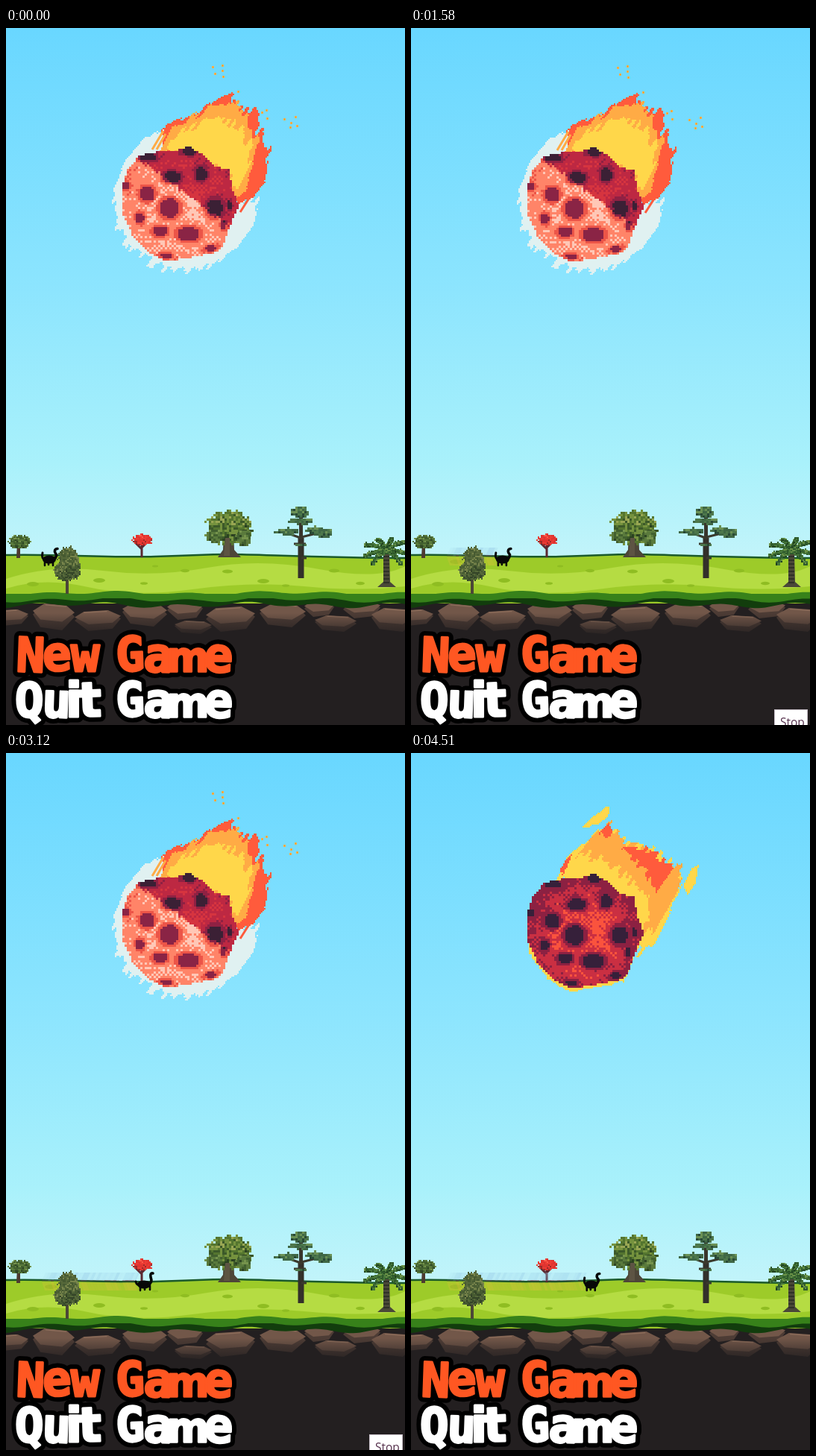
These frames come from a looping animation (535 px wide and 935 px high, 4.58 s). An HTML page with a canvas:

```html
<!DOCTYPE html>
<html lang="en">
<head>
<meta charset="utf-8">
<title>Meteor menu</title>
<style>
html, body { margin: 0; width: 100%; height: 100%; overflow: hidden; background: #231f20; }
canvas, svg { position: absolute; left: 0; top: 0; width: 535px; height: 935px; display: block; }
.menu { font: bold 64px "DejaVu Sans Mono", monospace; stroke-linejoin: round; }
.menu .s { font-family: "DejaVu Sans", sans-serif; }
.menu .m { font-size: 55px; }
.tip { font: 15.5px "Open Sans", sans-serif; }
</style>
</head>
<body>
<canvas id="stage" width="535" height="935"></canvas>
<svg viewBox="0 0 535 935">
  <defs>
    <text id="new" class="menu" y="863" rotate="2 -3 0 0 -2 2 0 2"><tspan x="13">N</tspan><tspan x="50">e</tspan><tspan x="87">w</tspan> <tspan x="148">G</tspan><tspan x="184">a</tspan><tspan class="s m" x="215">m</tspan><tspan x="265">e</tspan></text>
    <text id="quit" class="menu" y="924" rotate="0 2 0 -2 0 -2 2 0 2"><tspan x="12">Q</tspan><tspan x="48">u</tspan><tspan class="s" x="80">i</tspan><tspan class="s" x="98">t</tspan> <tspan x="148">G</tspan><tspan x="184">a</tspan><tspan class="s m" x="215">m</tspan><tspan x="265">e</tspan></text>
  </defs>
  <g stroke="#000" stroke-width="15"><use href="#new"/><use href="#quit"/></g>
  <use href="#new" fill="#ff5722" stroke="#ff5722" stroke-width="3"/>
  <use href="#quit" fill="#fff" stroke="#fff" stroke-width="3"/>
  <g id="tip" class="tip">
    <rect x="487.5" y="914.5" width="44" height="30" fill="#fff" stroke="#c9c0c9"/>
    <text x="495" y="936.5" fill="#55304c">Stop</text>
  </g>
</svg>
<script>
const W = 535, H = 935, LOOP = 4580, STEP = LOOP / 70, BEAT = 520;

const hash = (a, b = 0) => {
  const s = Math.sin(a * 127.1 + b * 311.7) * 43758.5453;
  return s - Math.floor(s);
};
const pick = (list, r) => list[Math.min(list.length - 1, Math.floor(r * list.length))];
const layer = () => Object.assign(document.createElement('canvas'), { width: W, height: H }).getContext('2d');
const poly = pts => new Path2D('M' + pts + 'Z');

function fill(g, color, d) {
  g.fillStyle = color;
  g.fill(new Path2D(d));
}

function line(g, color, width, d) {
  g.strokeStyle = color;
  g.lineWidth = width;
  g.stroke(new Path2D(d));
}

function ellipse(g, color, x, y, rx, ry) {
  g.fillStyle = color;
  g.beginPath();
  g.ellipse(x, y, rx, ry, 0, 0, 7);
  g.fill();
}

// Speckled clump of leaves, lighter toward the top
function leaves(g, cols, x, y, rx, ry, px = 2) {
  for (let j = -ry; j < ry; j += px)
    for (let i = -rx; i < rx; i += px) {
      const d = (i / rx) ** 2 + (j / ry) ** 2;
      const r = hash(x + i, y + j);
      if (d > .6 + .5 * r) continue;
      g.fillStyle = pick(cols, .65 * hash(y + j, x + i) + .35 * (.5 + j / ry / 2));
      g.fillRect(Math.round(x + i), Math.round(y + j), px, px);
    }
}

// ---- Scenery ----
function scenery() {
  const g = layer();
  const sky = g.createLinearGradient(0, 0, 0, 710);
  [[0, '#69d7ff'], [.5, '#8de5fe'], [.82, '#a9f1fb'], [1, '#c2f4fa']].forEach(s => sky.addColorStop(...s));
  g.fillStyle = sky;
  g.fillRect(0, 0, W, 720);

  const ridge = 'M0 707C60 705 130 711 200 709S260 706 300 706S420 711 535 711';
  fill(g, '#9dcb29', ridge + 'V780H0Z');
  line(g, '#1b5a2b', 2.5, ridge);
  fill(g, '#b5dc43', 'M0 739Q60 719 130 728T270 724T420 726T535 722V749Q470 756 400 749T250 753T110 750T0 752Z');
  for (const [x, y, r] of [[60, 716, 8], [36, 746, 8], [125, 741, 8], [185, 745, 5], [240, 728, 6],
    [297, 729, 7], [345, 742, 8], [375, 748, 5], [440, 728, 7], [475, 745, 6], [200, 722, 4]])
    ellipse(g, '#8fbd22', x, y, r, r * .36);

  fill(g, '#231f20', 'M0 772H535V935H0Z');
  const stones = [[-22, 780, 52, 22], [36, 772, 56, 36], [92, 781, 62, 28], [156, 770, 60, 33], [216, 768, 48, 26],
    [226, 795, 50, 18], [268, 776, 66, 34], [340, 772, 62, 32], [400, 768, 40, 22], [414, 788, 56, 22],
    [452, 768, 50, 24], [490, 778, 60, 32]];
  stones.forEach(([x, y, w, h], k) => {
    const at = (u, v, s) => `${x + w * (k % 2 ? 1 - u : u)},${y + h * v * s}`;
    const stone = s => [[0, .5], [.2, .1], [.72, 0], [1, .4], [.82, .88], [.3, 1]].map(p => at(...p, s)).join(' ');
    g.fillStyle = '#4d3c35';
    g.fill(poly(stone(1)));
    g.fillStyle = '#725749';
    g.fill(poly(stone(.68)));
    line(g, '#8a6b59', 1.5, `M${at(.2, .12, 1)} ${at(.7, .05, 1)}`);
  });
  const fade = g.createLinearGradient(0, 785, 0, 820);
  fade.addColorStop(0, '#231f2000');
  fade.addColorStop(1, '#231f20');
  g.fillStyle = fade;
  g.fillRect(0, 785, W, 40);

  const turf = (base, amp, ph) => {
    let d = 'M0 758';
    for (let x = 0; x <= W; x += 5)
      d += `L${x} ${base + amp * Math.sin(x / 15 + ph) + amp * .7 * Math.sin(x / 37 + ph)}`;
    return d;
  };
  const top = turf(758, 1.8, 1) + 'L535 765H0Z';
  fill(g, '#123d0d', turf(774, 2.6, 2) + 'V760H0Z');
  fill(g, '#37811a', turf(767, 2.2, 1) + 'V759H0Z');
  fill(g, '#37811a', top);

  const green = ['#75934c', '#5a7a3c', '#42602f', '#2d4423'];
  fill(g, '#4d3a30', 'M15 690H19V711H14Z');
  leaves(g, green, 18, 688, 16, 10);

  line(g, '#5b2730', 3, 'M182 710V686M182 699L174 691M182 697L190 689');
  leaves(g, ['#ff5b48', '#ec3c34', '#e03430', '#9c2b28'], 182, 686, 14, 8);

  fill(g, '#4d4638', 'M292 672H305L306 700L315 710H284L291 700Z');
  leaves(g, ['#98a653', '#75923e', '#54752f', '#3c5929', '#2b4121'], 298, 668, 32, 25, 3);
  leaves(g, green, 278, 680, 12, 10, 3);
  leaves(g, green, 318, 683, 11, 12, 3);
  fill(g, '#5d5443', 'M294 684H300V708H292Z');

  line(g, '#33302a', 8, 'M395.5 738V684');
  line(g, '#39362d', 5, 'M395.5 686V650');
  line(g, '#3a3a2d', 3, 'M395 684L370 675M396 683L424 676M386 692H402M396 711H403');
  for (const p of [[392, 648, 13, 9], [393, 660, 18, 5], [376, 674, 17, 5], [412, 672, 14, 5], [425, 676, 12, 7], [394, 691, 9, 2]])
    leaves(g, ['#6b9155', '#4d774b', '#3f6745', '#294936'], ...p, 3);

  fill(g, '#4a4838', 'M506 704H514L515 743L523 750H498L506 743Z');
  for (let y = 708; y < 746; y += 5) fill(g, '#2f3127', `M506 ${y}h8v2h-8Z`);
  for (const [x, y] of [[481, 693], [480, 708], [490, 718], [497, 686], [516, 685], [533, 689], [538, 706], [529, 718]])
    for (let k = 0; k <= 1; k += .16) {
      const cx = 510 + (x - 510) * k, cy = 700 + (y - 700) * k - 9 * k * (1 - k);
      leaves(g, ['#6a9147', '#47773a', '#2f5a2c', '#20421f'], Math.round(cx), Math.round(cy), 4, 4);
    }
  return g.canvas;
}

function bush() {
  const g = layer();
  line(g, '#4b4737', 4, 'M82 759V720M82 740L74 728M82 738L91 726');
  for (const p of [[82, 709, 14, 15], [78, 727, 15, 15], [89, 722, 11, 18], [72, 730, 8, 8]])
    leaves(g, ['#77844b', '#56683a', '#465a31', '#344428'], ...p);
  return g.canvas;
}

// ---- Meteor ----
const RED = '#ff5b3c', ORANGE = '#ffab45', YELLOW = '#ffd74a';

const hot = halo => [
  ['#e0f1f1', 14, halo],
  [RED, 16, '206,165 210,131 240,119 270,104 298,87 308,100 332,108 338,135 352,157 347,205 332,224 306,238 250,200'],
  [ORANGE, 16, '206,165 222,131 270,108 299,97 322,113 338,150 332,180 318,222 300,232 240,190'],
  [YELLOW, 20, '213,168 225,142 262,127 300,122 322,150 328,178 310,216 298,205 260,175']
];
const poses = {
  hot: { lit: true, seed: 1, layers: hot('210,134 180,152 158,178 143,215 145,260 165,295 200,318 237,326 275,318 310,292 332,262 338,228 300,235 234,200') },
  burst: { lit: true, seed: 4, layers: hot('208,126 176,144 151,172 135,214 137,262 160,300 198,325 237,334 278,326 316,297 340,264 346,226 300,235 234,200') },
  warm: { seed: 2, lift: 2, layers: [
    ['#ffe9a8', 4, '162,190 150,220 152,262 170,297 200,318 230,327 262,317 295,295 303,265 234,230'],
    [YELLOW, 20, '190,170 200,141 230,112 265,100 298,101 325,122 345,128 364,145 372,160 355,195 335,228 314,266 298,262 270,190'],
    [ORANGE, 24, '255,160 268,128 300,125 335,160 360,170 338,215 315,262 305,255 318,205 290,178'],
    [YELLOW, 16, '225,165 250,125 275,130 300,160 335,175 322,220 305,215 285,185'],
    [RED, 14, '190,166 200,141 225,122 216,148'],
    [RED, 18, '285,126 308,123 333,148 366,144 355,166 336,184 308,158'],
    [YELLOW, 12, '243,80 255,72 268,59 277,64 266,79'],
    [YELLOW, 14, '366,158 374,141 388,136 383,158 373,169']
  ] },
  cool: { seed: 3, lift: 3, layers: [
    [YELLOW, 4, '168,190 155,220 158,267 180,300 212,319 250,314 285,305 300,265'],
    [YELLOW, 18, '194,170 205,143 226,122 246,108 262,97 285,120 320,130 350,150 364,165 350,205 322,262 305,267 270,190'],
    [ORANGE, 22, '222,135 244,110 262,98 285,120 348,148 366,160 350,195 322,245 312,225 318,190 280,160 250,142'],
    [YELLOW, 14, '205,165 240,142 280,160 310,190 318,225 303,225 285,192'],
    [RED, 16, '282,126 312,127 352,152 328,186 314,160'],
    [RED, 10, '250,106 262,96 270,106 258,116'],
    [RED, 10, '196,160 205,145 214,137 206,158'],
    [YELLOW, 14, '230,97 243,83 265,70 262,87 245,98'],
    [YELLOW, 14, '362,180 373,157 383,152 378,178 368,192']
  ] }
};
poses.flare = { ...poses.cool, seed: 9 };

const sparks = [[276, 51], [289, 49], [289, 56], [279, 60], [290, 64], [310, 84], [310, 97], [312, 105], [348, 109],
  [342, 112], [349, 120], [372, 121], [381, 126], [387, 118], [380, 132], [389, 130]];
const craters = [[244, 163, 10, 6], [221, 199, 12, 8], [188, 221, 10, 10], [260, 194, 8, 9], [278, 240, 11, 12],
  [218, 240, 13, 13], [178, 253, 6, 7], [205, 271, 10, 7], [243, 275, 15, 9], [214, 304, 8, 4], [273, 294, 8, 4],
  [160, 210, 5, 6], [290, 263, 4, 6], [189, 172, 11, 5], [298, 236, 3, 6]];
const rim = poly('155,212 163,190 178,171 205,165 227,164 245,158 264,170 278,184 298,190 303,215 312,237 301,262 291,290 283,300 240,309 215,312 190,300 170,280 157,250');
const tones = {
  pale: ['#8a2445', '#ec5548', '#ff8468', '#ffc7b6'],
  shade: ['#3b2035', '#8f2143', '#bd2842', '#d6343f'],
  dark: ['#36203a', '#8c2142', '#ca2f42', '#fa533d']
};

// Each slanted lane slides the outline by its own amount
function streaks(g, color, amp, pts, seed) {
  const p = poly(pts);
  g.fillStyle = color;
  for (let y = 40; y < 345; y += 2)
    for (let x = 124; x < 402; x += 2) {
      const k = (hash(Math.round((x * .83 + y * .56) / 4), seed) - .5) * amp;
      if (g.isPointInPath(p, x - .56 * k, y + .83 * k)) g.fillRect(x, y, 2, 2);
    }
}

function rock(g, lit) {
  const px = 3;
  for (let y = 156; y < 316; y += px)
    for (let x = 153; x < 316; x += px) {
      if (!g.isPointInPath(rim, x + 1, y + 1)) continue;
      const near = Math.min(...craters.map(([cx, cy, rx, ry]) => Math.hypot((x - cx) / rx, (y - cy) / ry)));
      const edge = Math.hypot(x - 230, y - 242) / 78;
      const noise = hash(x, y) * .5 + ((x + y) / px % 2 ? .25 : 0);
      const shaded = (x - 234) * .6 - (y - 215) * .8 + noise * 8 > 2;
      const set = !lit ? tones.dark : shaded ? tones.shade : tones.pale;
      let v = near < 1 ? 0 : near < 1.35 ? 1 + noise * .7 : 1.9 + noise * 1.5 + Math.min(near - 1.35, .8) * .9;
      if (near >= 1) v -= Math.max(0, edge - .55) * (lit ? 1.6 : 3.6);
      if (near >= 1) v = Math.max(1, v);
      g.fillStyle = set[Math.min(3, Math.floor(v))];
      g.fillRect(x, y, px, px);
    }
}

function meteor({ lit, seed, layers, lift = 0 }) {
  const g = layer();
  layers.forEach(([color, amp, pts], k) => streaks(g, color, amp, pts, seed + k * 7));
  if (lit) {
    g.fillStyle = ORANGE;
    sparks.forEach(([x, y]) => g.fillRect(x, y, 3, 3));
    line(g, ORANGE, 3, 'M196 163L211 138M202 163L214 142');
    line(g, RED, 3, 'M314 247L328 225M307 240L318 226');
  }
  g.translate(0, lift);
  const body = layer();
  rock(body, lit);
  g.drawImage(body.canvas, 0, 0);
  return { img: g.canvas, lift };
}

// ---- Dinosaur ----
const necks = [
  'M17 713Q23 708 19 704Q17 699 22 698.5',
  'M17 713Q22 709 19 703Q19 698 24 699.5',
  'M16 714Q23 711 20 703Q19 697 23 698'
];
const tails = ['M6 714Q0 712 2 704', 'M6 714Q1 711 2 703', 'M6 714Q1 714 0 709'];
const legs = ['M5 715V721M10 715V720M16 715V721', 'M4 715L3 720M9 715V721M17 715L18 720', 'M6 715V721M12 715V720M19 714V720'];

function dino(g, x, k) {
  g.save();
  g.translate(x, 0);
  g.lineCap = 'round';
  ellipse(g, '#080808', 11, 713, 9, 5.5);
  line(g, '#080808', 3, tails[k]);
  line(g, '#080808', 3.6, necks[k]);
  line(g, '#080808', 2.6, legs[k]);
  g.restore();
}

function trail(g, end) {
  for (let x = 48; x < end; x += 4) {
    const r = hash(x), w = Math.min(4, end - x);
    g.globalAlpha = .12 + .3 * r;
    fill(g, '#e9bd3e', `M${x} 710h${w}l4 11h${-w}Z`);
    g.globalAlpha = .1 + .3 * hash(x, 2);
    fill(g, '#8fc3e2', `M${x + 5} 697h${w}l-5 11h${-w}Z`);
    g.globalAlpha = .5 * r;
    fill(g, '#5a2030', `M${x} 707h${w}v2h${-w}Z`);
  }
  g.globalAlpha = 1;
}

// ---- Playback ----
const g = document.getElementById('stage').getContext('2d');
const tip = document.getElementById('tip');
const back = scenery(), front = bush(), sprites = {};
for (const name in poses) sprites[name] = meteor(poses[name]);

const cycle = [[35, 'hot'], [98, 'burst'], [230, 'flare'], [400, 'cool'], [470, 'warm'], [BEAT, 'hot']];

function draw(now) {
  const t = Math.floor((now % LOOP) / STEP + .05) * STEP;
  const { img, lift } = sprites[cycle.find(([end]) => t % BEAT < end)[1]];
  const x = 47 + t * .0413;
  const walk = t % 400 / 400;
  g.drawImage(back, 0, 0);
  g.drawImage(img, 0, Math.round(t * .0007) - lift);
  trail(g, x);
  dino(g, x, walk < .2 || walk >= .9 ? 0 : walk < .5 ? 1 : 2);
  g.drawImage(front, 0, 0);
  tip.style.display = t > 850 && t < 4440 ? '' : 'none';
}

const start = performance.now();
(function tick() {
  draw(performance.now() - start);
  requestAnimationFrame(tick);
})();
</script>
</body>
</html>
```
